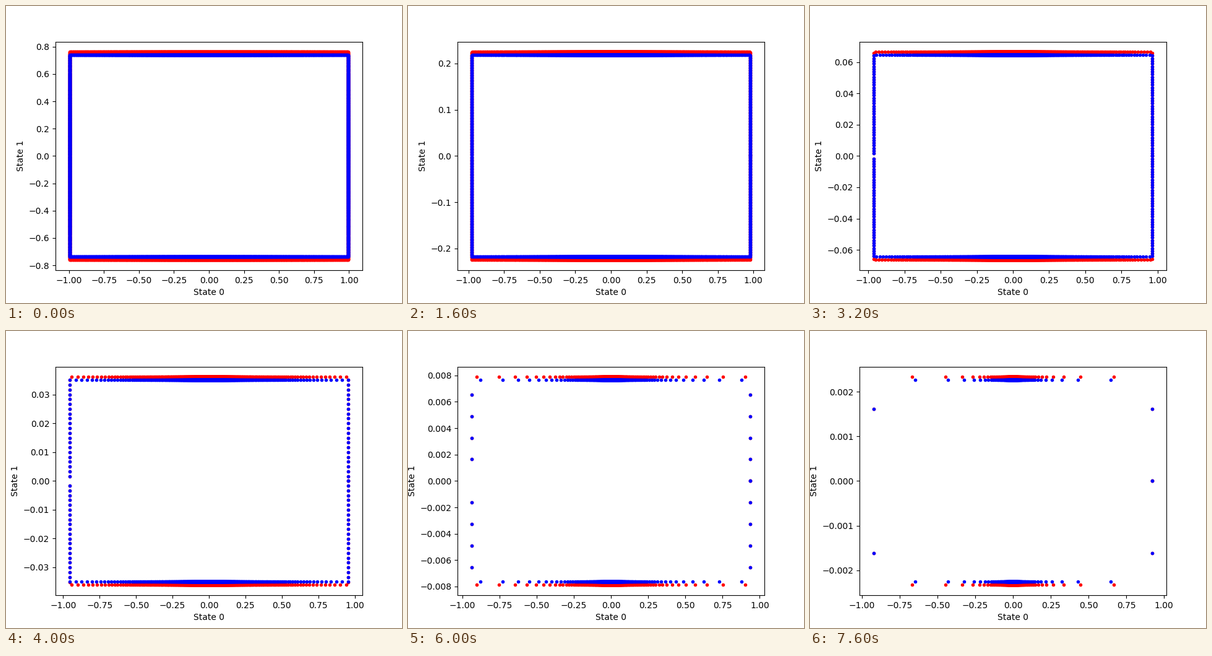
Animation, 640 px wide and 480 px high, one loop 8000 ms. Source, as a matplotlib script:

```python
import numpy as np
import matplotlib.pyplot as plt
from matplotlib.animation import FuncAnimation

STEPS = 20
DECAY_0, DECAY_1 = 0.996, 0.7374   # shrink factor of each state per step
OUTER = 1.031                      # looseness of the outer bound on state 1

# Rays every 0.1 degree, closed at 360; the ray at exactly 180 has no hit.
angles = np.delete(np.linspace(0, 2 * np.pi, 3601), 1800)
ray_x, ray_y = np.cos(angles), np.sin(angles)


def box_hits(half_w, half_h):
    """Points where the rays from the centre meet a box."""
    reach = 1 / np.maximum(np.abs(ray_x) / half_w, np.abs(ray_y) / half_h)
    return reach * ray_x, reach * ray_y


fig, ax = plt.subplots(figsize=(6.4, 4.8), dpi=100)
outer, = ax.plot([], [], "r.")
inner, = ax.plot([], [], "b.")
ax.set_xlabel("State 0")
ax.set_ylabel("State 1")


def update(step):
    half_w = DECAY_0 ** (step + 1)
    half_h = DECAY_1 ** (step + 1)
    outer.set_data(*box_hits(half_w, OUTER * half_h))
    inner.set_data(*box_hits(half_w, half_h))
    ax.relim()
    ax.autoscale_view()
    return outer, inner


anim = FuncAnimation(fig, update, frames=STEPS, interval=400,
                     repeat=True, repeat_delay=0, blit=False)
plt.show()
```
